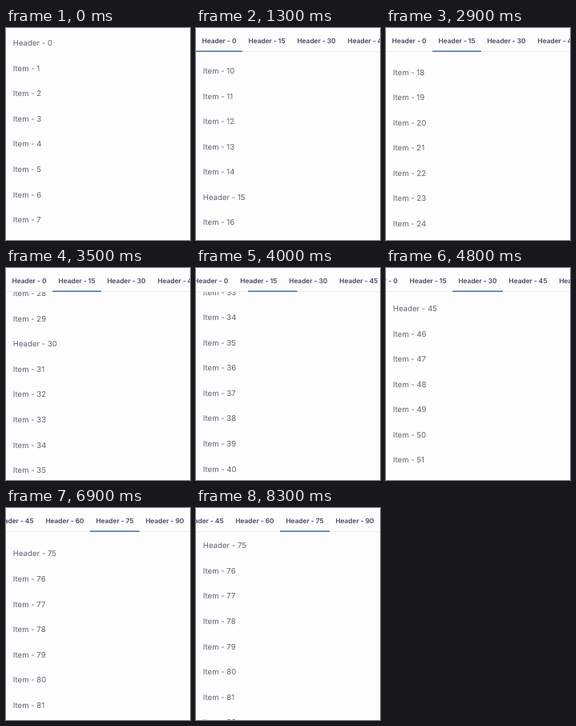
Recreate the animation shown at these times as an HTML page. Size 230x265 px, loop 8600 ms.

```html
<!DOCTYPE html>
<html lang="en">
<head>
<meta charset="utf-8">
<title>List with synced tabs</title>
<style>
html, body { margin: 0; width: 100%; height: 100%; overflow: hidden; background: #fdfdfd; }
svg { display: block; width: 230px; height: 265px; }
text { font-family: Inter, sans-serif; white-space: pre; text-rendering: geometricPrecision; }
#rows text { font-size: 9.6px; fill: #5f6475; }
#strip text { font-size: 8.3px; font-weight: 600; fill: #434862; text-anchor: middle; }
</style>
</head>
<body>
<svg viewBox="0 0 230 265">
  <rect width="230" height="265" fill="#fdfdfd"/>
  <g id="rows"></g>
  <g id="bar">
    <rect width="230" height="30" fill="#fdfdfd"/>
    <rect y="29" width="230" height="1" fill="#ecebef"/>
    <g id="strip"><rect id="mark" y="28.3" height="1.7" fill="#5a7fae"/></g>
  </g>
</svg>
<script>
const LOOP = 8600, STEP = 100;
const PITCH = 31.57, SECTION = 15, BASELINE = 22.1;
const edges = [0, 58, 119, 182, 245, 308, 370, 433];
const $ = id => document.getElementById(id);

const clamp = x => Math.min(1, Math.max(0, x));
const fling = u => 1 - (1 - u ** 1.6) ** 3;
const smooth = u => u * u * (3 - 2 * u);
const cubic = u => u < .5 ? 4 * u ** 3 : 1 - 4 * (1 - u) ** 3;

// Each move: start ms, end ms, final value, easing
const scrollMoves = [
  [850, 1750, 401.7, fling],
  [1750, 2650, 520.9, fling],
  [2850, 3750, 896, fling],
  [3750, 4800, 1388.7, fling],
  [6280, 7000, 2339.6, cubic]
];
const markMoves = [
  [2003, 2503, 1, smooth],
  [3824, 4324, 2, smooth],
  [6280, 6900, 5, smooth]
];
const stripMoves = [
  [3824, 4324, 36, smooth],
  [5450, 5900, 203, smooth]
];

function valueAt(moves, t) {
  let v = 0;
  for (const [start, end, to, ease] of moves) {
    v += (to - v) * ease(clamp((t - start) / (end - start)));
  }
  return v;
}

function addText(parent, x, y, label = "") {
  const el = document.createElementNS("http://www.w3.org/2000/svg", "text");
  el.setAttribute("x", x);
  el.setAttribute("y", y);
  el.textContent = label;
  parent.append(el);
  return el;
}

function edgeAt(pos) {
  const i = Math.min(Math.floor(pos), edges.length - 2);
  return edges[i] + (edges[i + 1] - edges[i]) * (pos - i);
}

for (let i = 0; i < edges.length - 1; i++) {
  addText($("strip"), (edges[i] + edges[i + 1]) / 2, 18.5, "Header - " + i * SECTION);
}
const pool = Array.from({ length: 11 }, () => addText($("rows"), 8.8, 0));

function draw(t) {
  const scroll = valueAt(scrollMoves, t);
  const first = Math.max(0, Math.floor(scroll / PITCH) - 1);
  pool.forEach((el, k) => {
    const n = first + k;
    el.textContent = (n % SECTION ? "Item - " : "Header - ") + n;
    el.setAttribute("y", (BASELINE + n * PITCH - scroll).toFixed(2));
  });

  const tab = valueAt(markMoves, t);
  const left = edgeAt(tab);
  $("mark").setAttribute("x", left);
  $("mark").setAttribute("width", edgeAt(tab + 1) - left);
  $("strip").setAttribute("transform", `translate(${-valueAt(stripMoves, t)} 0)`);
  $("bar").setAttribute("opacity", clamp(scroll / 60));
}

const origin = performance.now();
function tick() {
  const t = (performance.now() - origin) % LOOP;
  draw(Math.floor(t / STEP) * STEP);
  requestAnimationFrame(tick);
}
tick();
</script>
</body>
</html>
```
